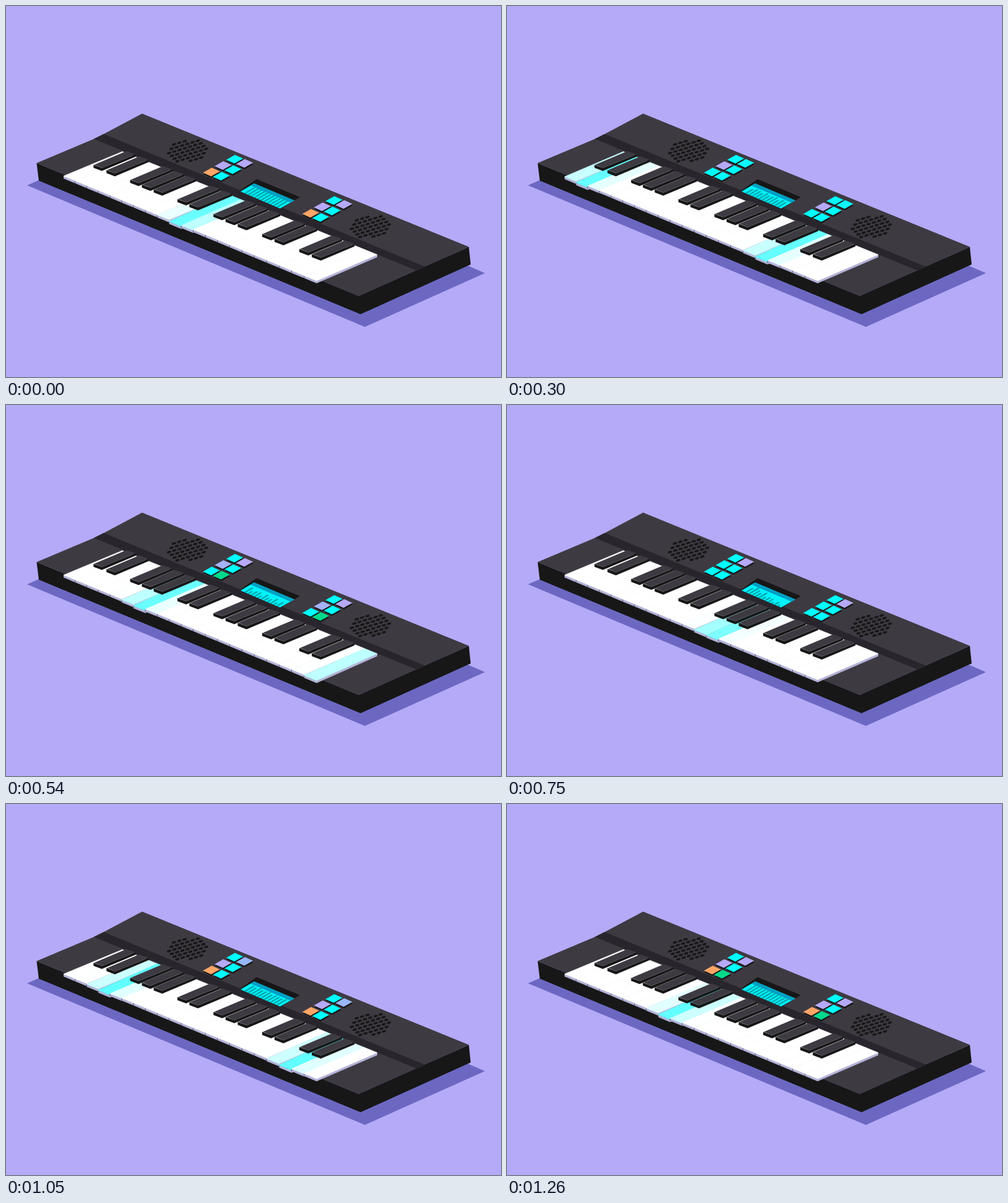
These frames come from a looping animation (800 px wide and 600 px high, 1290 ms). An HTML page with a canvas:

```html
<!DOCTYPE html>
<html lang="en">
<head>
<meta charset="utf-8">
<title>Keyboard</title>
<style>
  html, body { margin: 0; width: 100%; height: 100%; overflow: hidden; background: #b5aaf7; }
  canvas { display: block; width: 800px; height: 600px; }
</style>
</head>
<body>
<canvas id="stage" width="800" height="600"></canvas>
<script>
const ctx = document.getElementById('stage').getContext('2d');
const LOOP = 1290, STEP = 30, BEAT = LOOP / 2, KEYS = 21;
const DARK = '#171717', PANEL = '#3e3a42', GROOVE = '#29252d', SIDE = '#b3b2d8';
const BACK = '#b5aaf7', SHADOW = '#6c68c2';
const CYAN = '#00ffff', ORANGE = '#ffa567', GREEN = '#00d98b';

function poly(fill, ...p) {
  ctx.fillStyle = fill;
  ctx.beginPath();
  for (let i = 0; i < p.length; i += 2) ctx.lineTo(p[i], p[i + 1]);
  ctx.closePath();
  ctx.fill();
}

// Fades a colour towards cyan.
function toCyan([r, g, b], k) {
  return `rgb(${r * (1 - k)}, ${g + (255 - g) * k}, ${b + (255 - b) * k})`;
}

// Smooth pulse: 1 at the centre, 0 beyond the given reach.
function pulse(t, centre, reach) {
  const d = Math.min(1, Math.abs(t - centre) / reach);
  return Math.cos(d * Math.PI / 2) ** 2;
}

function drawBody() {
  poly(BACK, 0, 0, 800, 0, 800, 600, 0, 600);
  poly(SHADOW, 34, 290, 580, 519, 774, 432, 240, 200);
  poly(DARK, 49.5, 254, 570, 469, 748, 389.5, 751, 418, 573, 498.6, 53, 282.6);
  poly(PANEL, 49.5, 254, 142, 215, 158, 207, 220, 174, 748, 389.5, 570, 469);
  poly(GROOVE, 142, 215, 158, 207, 678, 422, 664, 428);
}

function drawSpeaker(cx, cy) {
  ctx.fillStyle = DARK;
  for (let a = -9; a <= 9; a++) {
    for (let b = -9; b <= 9; b++) {
      const x = a * 4.5 + b * 8.5, y = a * 4.4 - b * 2.6;
      if (Math.hypot(x / 34, (y + x * 0.12) / 17.5) > 1) continue;
      ctx.beginPath();
      ctx.ellipse(cx + x, cy + y, 3.6, 1.9, -0.3, 0, 7);
      ctx.fill();
    }
  }
}

// Colours run from the front row to the back, left then right.
function drawButtons(dx, dy, colors) {
  const quad = (fill, x, y) =>
    poly(fill, x - 13.7, y + 1, x + 0.5, y - 7, x + 13.7, y - 1, x - 0.5, y + 7);
  for (const layer of [0, 1]) {
    colors.forEach((color, i) => {
      const row = i >> 1, col = i % 2;
      const x = 332 + dx + row * 18.8 + col * 16;
      const y = 268.5 + dy - row * 10.4 + col * 6.7;
      if (layer) quad(color, x, y);
      else quad(DARK, x + 0.5, y + 2.5);
    });
  }
}

function buttonColors(t) {
  const lilac = [181, 170, 247];
  const warm = t < 90 || t >= 900;
  const green = (t >= 330 && t < 630) || t >= 1140;
  return [
    warm ? ORANGE : CYAN, green ? GREEN : CYAN,
    toCyan(lilac, pulse(t, 750, 260)), CYAN,
    CYAN, toCyan(lilac, pulse(t % BEAT, 320, 115))
  ];
}

function drawScreen(t) {
  poly(DARK, 378, 299, 405, 280, 475, 309, 444, 328);
  poly('#00f2fa', 379, 300, 401, 287, 466, 314.5, 443, 327.5);
  poly('#009fc4', 395, 290.5, 401, 287, 466, 314.5, 460, 318);
  const turn = t / LOOP * Math.PI * 2;
  const level = 0.67 + 0.24 * Math.cos(turn);
  const jag = 0.11 - 0.08 * Math.cos(turn);
  const tilt = 0.33 * pulse(t, 750, 260);
  for (let i = 0; i < 11; i++) {
    const x = 385 + i * 5.2, y = 302.3 + i * 2.2;
    const h = Math.max(0.15, level - tilt * (i - 5) / 5 + jag * Math.sin(i * 2.4 + turn * 3));
    const vx = 18.5 * h, vy = -10.8 * h;
    poly('#00a9ad', x, y, x + vx, y + vy, x + vx + 2.7, y + vy + 1.15, x + 2.7, y + 1.15);
  }
}

// Front x of the seam left of key i; keys widen slightly to the right.
const seam = i => 93 + 18.567 * i + 0.0433 * i * i;

function drawWhiteKeys(t) {
  // The wave runs fifteen keys per beat, so two of them overlap at the ends.
  const u = t % BEAT / BEAT;
  const pos = 9.2 + 15 * u - Math.sin(Math.PI * u ** 3);
  const glow = d => Math.exp(-1.4 * d * d);
  const edge = i => {
    const x = seam(i), bx = x + 95 + i / 7;
    return [x, 275 + (x - 93) * 0.4145, bx, 235.5 + (bx - 188) * 0.4045];
  };
  for (let i = 0; i < KEYS; i++) {
    const g = glow(i - pos) + glow(i - pos + 15);
    const [x0, y0, bx0, by0] = edge(i);
    const [x1, y1, bx1, by1] = edge(i + 1);
    const f0 = y0 + 3 * g, f1 = y1 + 3 * g;
    poly(SIDE, x0, f0, x1, f1, bx1, by1, bx1, by1 + 4, x1, f1 + 4, x0, f0 + 4);
    const tone = toCyan([255, 255, 255], 0.62 * g);
    poly(tone, x0, f0, x1, f1, bx1, by1, bx0, by0);
    ctx.strokeStyle = tone;
    ctx.lineWidth = 0.7;
    ctx.stroke();
    if (i) {
      ctx.fillStyle = '#55526a';
      ctx.fillRect(x0 - 0.5, f0 + 0.6, 1, 3.6);
    }
  }
}

function drawBlackKeys() {
  for (let i = 1; i < KEYS - 1; i++) {
    // No black key between E and F or between B and C.
    if (i % 7 === 0 || i % 7 === 3) continue;
    const x = seam(i) + 32.8 - 3 / (i * i), y = 256.5 + (x - 141) * 0.41;
    const w = 13.5 + i / 17, h = w * 0.38;
    const bx = x + w + 54.5, by = y + h - 22;
    poly(DARK, x, y, x + w, y + h, bx, by, bx, by + 4, x + w, y + h + 5, x, y + 5);
    poly(PANEL, x + 1, y, x + 53, y - 22, bx, by, x + w, y + h);
  }
}

function draw(now) {
  const t = Math.floor((now % LOOP) / STEP) * STEP;
  const colors = buttonColors(t);
  drawBody();
  drawSpeaker(293.5, 234.5);
  drawSpeaker(589, 357);
  drawButtons(0, 0, colors);
  drawButtons(160.5, 66.7, colors);
  drawScreen(t);
  drawWhiteKeys(t);
  drawBlackKeys();
}

let start;
function tick(now) {
  start ??= now;
  draw(now - start);
  requestAnimationFrame(tick);
}
draw(0);
requestAnimationFrame(tick);
</script>
</body>
</html>
```
